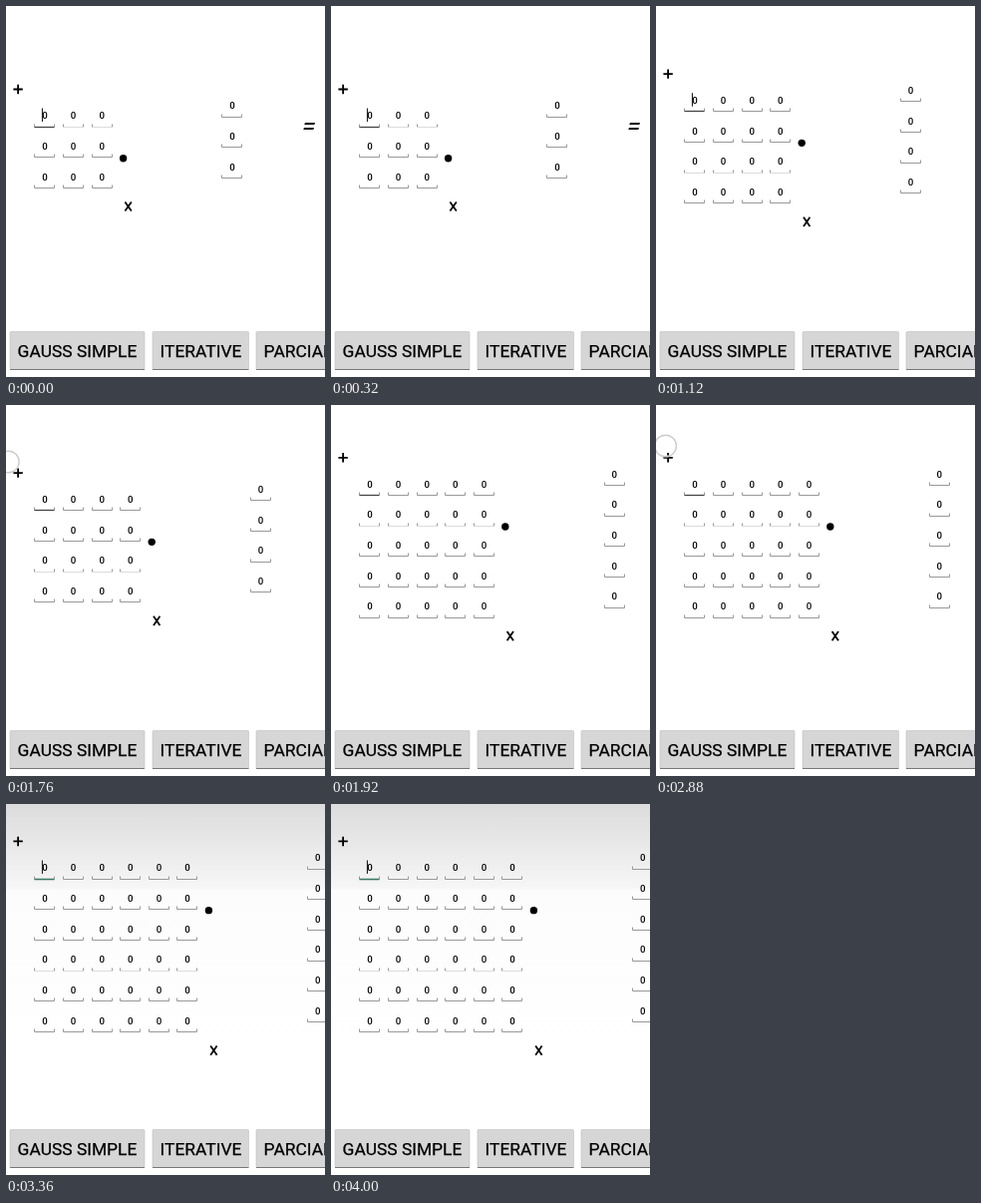
Animation, 320 px wide and 372 px high, one loop 4.48 s. Source, as an HTML page:

```html
<!DOCTYPE html>
<html lang="en">
<head>
<meta charset="utf-8">
<title>Matrix size</title>
<style>
html, body { margin: 0; width: 100%; height: 100%; overflow: hidden; background: #fff; }
svg { display: block; width: 320px; height: 372px; font-family: Roboto, sans-serif; }
.cell { font-size: 9.7px; font-weight: 500; text-anchor: middle; }
.line { fill: none; stroke: #999; }
.faint { stroke: #dcdcdc; }
.focus { stroke: #444; stroke-width: 1.3; }
.size6 .focus { stroke: #3c7765; stroke-width: 1.6; }
.sign { fill: none; stroke: #000; stroke-width: 1.8; }
.caret { fill: #222; }
.touch { fill: none; stroke: #ccc; stroke-width: 1.4; }
.button { fill: #d6d6d6; stroke: #c2c2c2; stroke-width: .6; }
.edge { fill: #777; }
.label { font-size: 17.4px; stroke: #000; stroke-width: .25; }

.size3, .size4, .size5, .size6, .caret, .touch { animation: 4480ms step-end infinite; }
.size3 { animation-name: size3; }
.size4 { animation-name: size4; }
.size5 { animation-name: size5; }
.size6 { animation-name: size6; }
.caret { animation-name: blink; }
.tap1 { animation-name: tap1; }
.tap2 { animation-name: tap2; }
.tap3 { animation-name: tap3; }

@keyframes size3 { 0% { opacity: 1 } 17.857%, 100% { opacity: 0 } }
@keyframes size4 { 0% { opacity: 0 } 17.857% { opacity: 1 } 42.857%, 100% { opacity: 0 } }
@keyframes size5 { 0% { opacity: 0 } 42.857% { opacity: 1 } 67.857%, 100% { opacity: 0 } }
@keyframes size6 { 0% { opacity: 0 } 67.857%, 100% { opacity: 1 } }
@keyframes blink {
  0%, 25%, 46.428%, 67.857%, 89.285%, 100% { opacity: 1 }
  14.285%, 35.714%, 57.142%, 82.142% { opacity: 0 }
}
@keyframes tap1 { 0% { opacity: 0 } 10.714% { opacity: 1 } 17.857%, 100% { opacity: 0 } }
@keyframes tap2 { 0% { opacity: 0 } 35.714% { opacity: 1 } 42.857%, 100% { opacity: 0 } }
@keyframes tap3 {
  0% { opacity: 0; fill: none }
  64.285% { opacity: 1; fill: none }
  67.857% { opacity: 1; fill: #fff9 }
  71.428%, 100% { opacity: 0; fill: none }
}
</style>
</head>
<body>
<svg id="stage" viewBox="0 0 320 372">
  <defs>
    <linearGradient id="shade" x2="0" y2="1">
      <stop offset="0" stop-color="#dcdcdc"/>
      <stop offset=".12" stop-color="#e5e5e5"/>
      <stop offset=".335" stop-color="#f6f6f6"/>
      <stop offset=".345" stop-color="#fcfcfc"/>
      <stop offset="1" stop-color="#fff"/>
    </linearGradient>
  </defs>
</svg>
<script>
const PITCH_X = 28.6, PITCH_Y = 30.7;

function cell(x, y, kind = '') {
  const left = Math.round(x - 10.6) + 0.5, base = Math.round(y + 10.6) + 0.5;
  const ticks = `M${left} ${base - 3}v3m20 0v-3`;
  const bar = `<path class="line ${kind}" d="M${left} ${base}h20"/>`;
  return `<path class="line" d="${ticks}"/>${bar}<text class="cell" x="${x}" y="${y + 3.3}">0</text>`;
}

function layout(n) {
  const grow = n - 3, top = 110 - grow * PITCH_Y / 2, shift = grow * PITCH_X;
  let out = n === 6 ? '<rect width="320" height="251" fill="url(#shade)"/>' : '';
  for (let row = 0; row < n; row++) {
    const y = top + row * PITCH_Y;
    const pale = [110, 156].includes(Math.round(y)) ? 'faint' : '';
    for (let col = 0; col < n; col++)
      out += cell(39 + col * PITCH_X, y, row + col ? pale : 'focus');
    out += cell(227 + shift, y - 9.95);
  }
  const eq = 299 + shift, timesY = 196.4 + grow * PITCH_Y / 2;
  out += `<rect class="caret" x="35.9" y="${top - 7.5}" width="1.1" height="13.5"/>
    <path class="sign" d="M7.4 ${top - 26.5}h9.4m-4.7 -4.7v9.4"/>
    <circle cx="${117.6 + shift}" cy="${top + 42.7}" r="3.7"/>
    <path class="sign" d="M${119.4 + shift} ${timesY}l6.4 9.2m0 -9.2l-6.4 9.2"/>
    <path d="M${eq + 1} 117h10l-.7 2.1h-10zM${eq} 122h10l-.7 2.1h-10z"/>`;
  return `<g class="size${n}">${out}</g>`;
}

function button(x, width, label) {
  return `<rect class="button" x="${x}" y="326.5" width="${width}" height="38" rx="1"/>
    <rect class="edge" x="${x}" y="364" width="${width}" height="1"/>
    <text class="label" x="${x + 7.6}" y="352.4">${label}</text>`;
}

function touch(i, x, y) {
  return `<circle class="touch tap${i}" cx="${x}" cy="${y}" r="10.8"/>`;
}

stage.insertAdjacentHTML('beforeend', [
  ...[3, 4, 5, 6].map(layout),
  touch(1, 5.7, 74.2), touch(2, 2.3, 57), touch(3, 9.6, 41),
  button(4, 135, 'GAUSS SIMPLE'), button(147, 96.5, 'ITERATIVE'), button(251, 90, 'PARCIAL')
].join(''));
</script>
</body>
</html>
```
